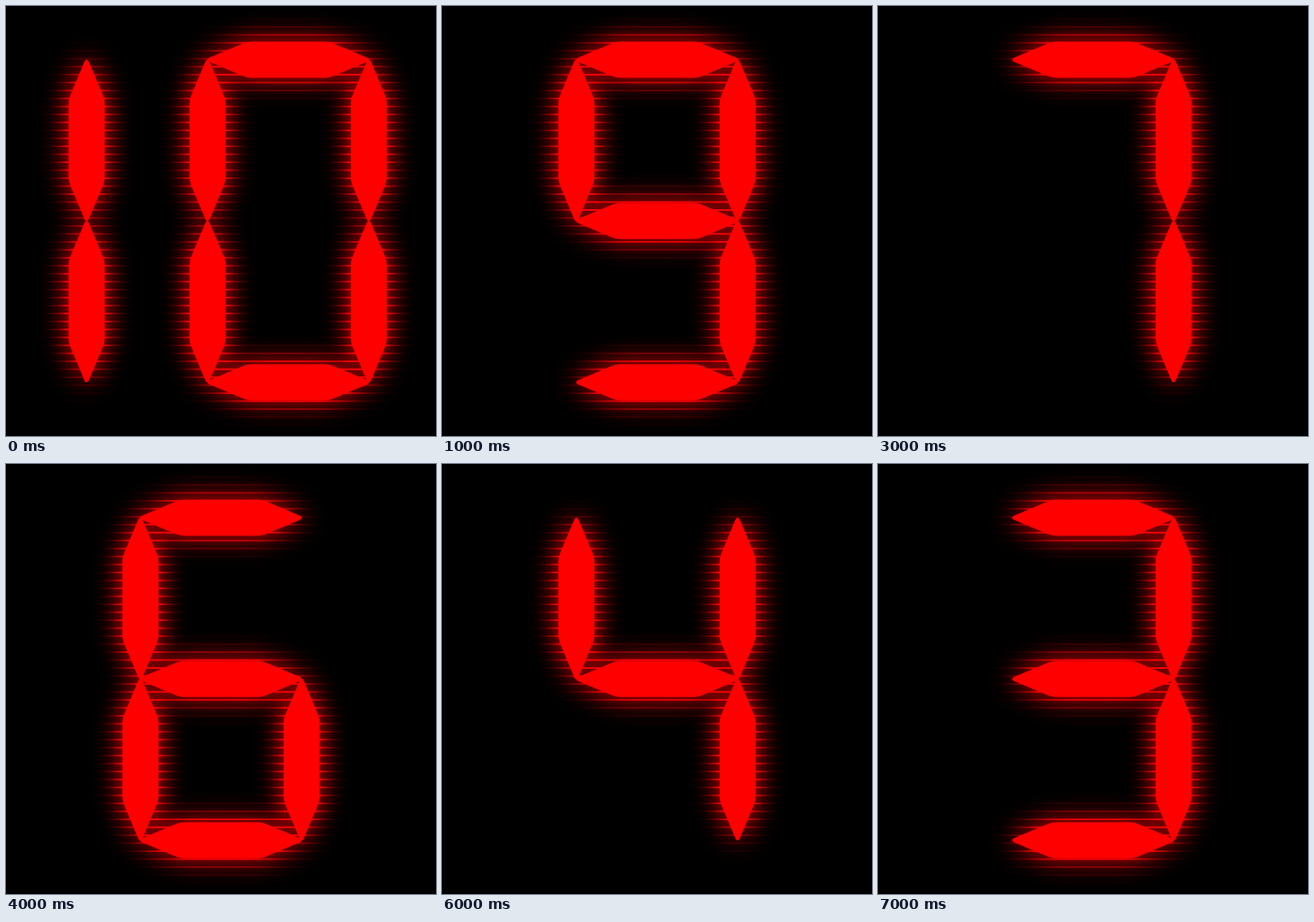
An HTML page with a canvas that plays this animation: 512 px wide and 512 px high, repeating every 8 s.

```html
<!DOCTYPE html>
<html lang="en">
<head>
<meta charset="utf-8">
<title>Countdown</title>
<style>
  html, body { margin: 0; width: 100%; height: 100%; overflow: hidden; background: #000; }
  canvas { display: block; width: 512px; height: 512px; }
</style>
</head>
<body>
<canvas id="stage" width="512" height="512"></canvas>
<script>
const SIZE = 512;
const LENGTH = 192;
const TOP = 64;
const GLOW_BLUR = 16;
const GLOW_GAIN = 2.2;
const SCAN_PITCH = SIZE / 54;
const SCAN_OFFSET = 5.9;
const SCAN_WIDTH = 1.9;
const FIRST = 10, LAST = 3;

const ctx = document.getElementById('stage').getContext('2d');

// Segment start in units of LENGTH, and whether it stands upright.
const SEGMENTS = {
  a: [0, 0, false], b: [1, 0, true], c: [1, 1, true], d: [0, 2, false],
  e: [0, 1, true], f: [0, 0, true], g: [0, 1, false]
};
const DIGITS = ['abcdef', 'bc', 'abged', 'abgcd', 'fgbc', 'afgcd',
                'afgedc', 'abc', 'abcdefg', 'abcdfg'];

function drawSegment(c, x, y, upright) {
  const tip = c.lineWidth / 2, half = 21.5 - tip, shoulder = LENGTH / 4, round = 24;
  const end = LENGTH - tip, farShoulder = LENGTH - shoulder;
  c.save();
  c.translate(x, y);
  if (upright) c.transform(0, 1, 1, 0, 0, 0);
  c.beginPath();
  c.moveTo(tip, 0);
  c.arcTo(shoulder, -half, farShoulder, -half, round);
  c.arcTo(farShoulder, -half, end, 0, round);
  c.lineTo(end, 0);
  c.arcTo(farShoulder, half, shoulder, half, round);
  c.arcTo(shoulder, half, tip, 0, round);
  c.closePath();
  c.fill();
  c.stroke();
  c.restore();
}

function drawDigit(c, digit, left) {
  for (const name of DIGITS[digit]) {
    const [col, row, upright] = SEGMENTS[name];
    drawSegment(c, left + col * LENGTH, TOP + row * LENGTH, upright);
  }
}

function makeShape(number) {
  const canvas = document.createElement('canvas');
  canvas.width = canvas.height = SIZE;
  const c = canvas.getContext('2d');
  c.fillStyle = c.strokeStyle = '#f00';
  c.lineWidth = 5;
  c.lineJoin = 'round';
  if (number > 9) {
    drawDigit(c, 1, 96 - LENGTH);
    drawDigit(c, number - 10, 240);
  } else {
    drawDigit(c, number, 160);
  }
  return canvas;
}

function drawGlow(shape) {
  ctx.save();
  ctx.globalCompositeOperation = 'lighter';
  ctx.filter = `blur(${GLOW_BLUR}px)`;
  for (let gain = GLOW_GAIN; gain > 0; gain--) {
    ctx.globalAlpha = Math.min(1, gain);
    ctx.drawImage(shape, 0, 0);
  }
  ctx.restore();
}

function dimBetweenScanlines() {
  ctx.fillStyle = 'rgba(0, 0, 0, 0.58)';
  for (let y = SCAN_OFFSET - SCAN_PITCH; y < SIZE; y += SCAN_PITCH) {
    ctx.fillRect(0, y + SCAN_WIDTH / 2, SIZE, SCAN_PITCH - SCAN_WIDTH);
  }
}

function drawNumber(number) {
  const shape = makeShape(number);
  ctx.fillStyle = '#000';
  ctx.fillRect(0, 0, SIZE, SIZE);
  drawGlow(shape);
  dimBetweenScanlines();
  ctx.drawImage(shape, 0, 0);
}

const start = performance.now();
let shown = null;

function tick() {
  const seconds = Math.floor(Math.max(0, performance.now() - start) / 1000);
  const number = FIRST - seconds % (FIRST - LAST + 1);
  if (number !== shown) drawNumber(shown = number);
  requestAnimationFrame(tick);
}
tick();
</script>
</body>
</html>
```
